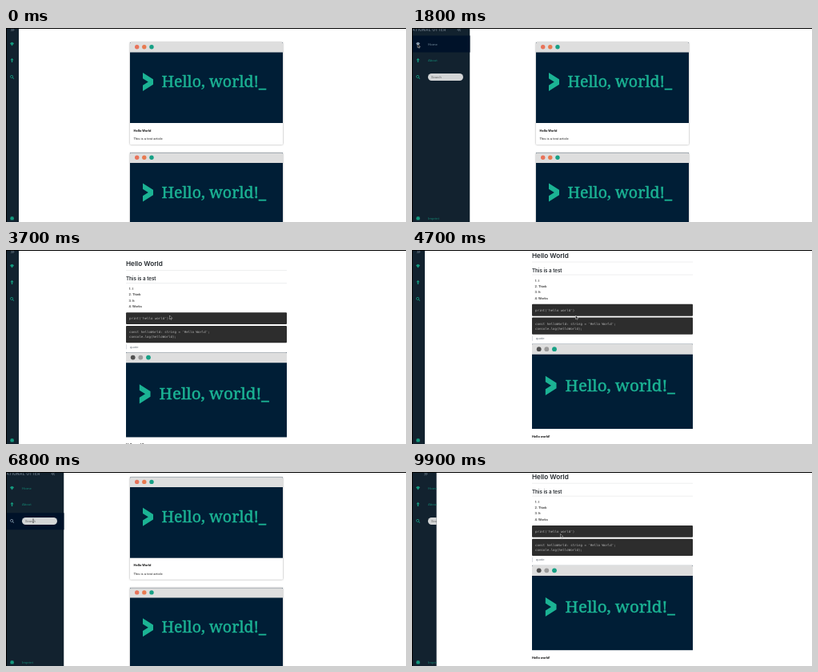
These frames come from a looping animation (500x243 px, 10 s). An HTML page:

```html
<!DOCTYPE html>
<html lang="en">
<head>
<meta charset="utf-8">
<title>Blog walkthrough</title>
<style>
html, body { margin: 0; width: 100%; height: 100%; overflow: hidden; background: #fff; }
svg { display: block; width: 100vw; height: 100vh; font-family: Roboto, sans-serif; font-size: 4.2px; }
.sheet { fill: #fff; filter: drop-shadow(0 .6px 1.2px rgba(0,0,0,.38)); }
.hero { font: 500 19.6px "Noto Serif", serif; fill: #1bb394; stroke: #1bb394; stroke-width: .45; }
.b { font-weight: 700; fill: #111; }
.h { font-family: Inter, sans-serif; font-weight: 600; fill: #24292e; }
.code { font: 4.08px "DejaVu Sans Mono", monospace; fill: #b4b4b4; white-space: pre; }
.list { fill: #333; font-weight: 500; }
.icon { fill: #14997f; stroke: none; }
.label { fill: #14806f; font-size: 4.4px; }
.on .icon { fill: #8296a8; }
.on .label { fill: #6f8798; }
.row { fill: #001229; opacity: 0; }
.on .row { opacity: 1; }
</style>
</head>
<body>
<svg viewBox="0 0 500 243" preserveAspectRatio="none">
  <defs>
    <g id="banner">
      <rect width="191" height="101" fill="#001e36"/>
      <path d="M0 12.4V1.2Q0 0 1.2 0H189.8Q191 0 191 1.2V12.4Z" fill="#dedede"/>
      <path d="M16 38 29 46.3V52.7L16 61V53.8L22.8 49.5 16 45.2Z" fill="#1bb394"/>
      <text class="hero" x="39.5" y="56">Hello, world!_</text>
    </g>
    <g id="card">
      <rect class="sheet" width="191" height="128" rx="1.2"/>
      <use href="#banner"/>
      <circle cx="8.7" cy="5.7" r="2.7" fill="#e8735a"/>
      <circle cx="17.8" cy="5.7" r="2.7" fill="#e87a50"/>
      <circle cx="27" cy="5.7" r="2.7" fill="#16a085"/>
      <text class="b" x="4.5" y="111.5">Hello World</text>
      <text x="4.5" y="122" fill="#222">This is a test article</text>
    </g>
    <clipPath id="clip"><rect id="clipBox" width="16" height="243"/></clipPath>
  </defs>

  <g id="home">
    <use href="#card" x="155" y="18"/>
    <use href="#card" x="155" y="156.5"/>
  </g>

  <g id="article">
    <text class="h" x="150" y="20.3" font-size="8.2">Hello World</text>
    <path d="M150 25.5H351M150 41.5H351" stroke="#e2e4e6" stroke-width=".6"/>
    <text class="h" x="150" y="38" font-size="6.2">This is a test</text>
    <g class="list" id="list"></g>
    <rect x="150" y="78.3" width="201" height="14.8" rx="1" fill="#2d2d2d"/>
    <rect x="150" y="95" width="201" height="21.2" rx="1" fill="#2d2d2d"/>
    <text class="code" x="154" y="87">print('hello world')</text>
    <text class="code" x="154" y="104">const helloWorld: string = 'Hello World';</text>
    <text class="code" x="154" y="110.3">console.log(helloWorld);</text>
    <rect x="150" y="118.3" width=".9" height="6" fill="#d5d9dd"/>
    <text x="154.8" y="122.6" fill="#6a737d">quote</text>
    <use href="#banner" transform="translate(150 128.2) scale(1.0524)"/>
    <circle cx="158.7" cy="134.6" r="2.9" fill="#525252"/>
    <circle cx="168.3" cy="134.6" r="2.9" fill="#9b9b9b"/>
    <circle cx="178" cy="134.6" r="2.9" fill="#16a085"/>
    <text class="b" x="150" y="245">Hello world!</text>
  </g>

  <g clip-path="url(#clip)">
    <rect width="72.5" height="243" fill="#12222f"/>
    <text id="brand" x="-3" y="4" font-size="5" font-weight="500" letter-spacing=".4" fill="#6e7c89">RATIONAL OTTER</text>
    <path id="fold" d="M-.3 -1.6-1.9 0-.3 1.6M1.7 -1.6.1 0 1.7 1.6" fill="none" stroke="#8493a0" stroke-width=".8"/>
    <g class="item">
      <rect class="row" y="9.5" width="73" height="21"/>
      <path class="icon" d="M5 19.3Q7.5 16.3 10 19.3L7.5 22.6Z"/>
      <text class="label" x="20" y="21.5">Home</text>
    </g>
    <g class="item">
      <rect class="row" y="30.5" width="73" height="21"/>
      <path class="icon" d="M7.5 37.8 9.6 40.2H8.2V43H6.8V40.2H5.4Z"/>
      <text class="label" x="20" y="42">About</text>
    </g>
    <g class="item">
      <rect class="row" y="51.3" width="73" height="21"/>
      <path class="icon" fill-rule="evenodd" d="M7.1 59a1.9 1.9 0 1 0 .01 0ZM7.1 59.8a1.1 1.1 0 1 1-.01 0ZM8.1 62.6 8.7 62 10.2 63.4 9.6 64Z"/>
      <rect x="20" y="57" width="44" height="9" rx="4.5" fill="#d3d5d6"/>
      <text id="query" x="24" y="63">Search</text>
    </g>
    <g class="item">
      <path class="icon" d="M5.6 236.6H7L7.6 235.8 8.3 236.6H9.6V238L10.2 238.6 9.6 239.2V240.4H5.6V239.2L5 238.6 5.6 238Z"/>
      <text class="label" x="20" y="239.8">Imprint</text>
    </g>
    <rect width="1" height="243" fill="#000"/>
  </g>
  <rect width="500" height="1" fill="#000"/>

  <g id="cursor">
    <path id="arrow" d="M0 0V4.6L1.1 3.7 1.8 5.3 2.6 4.9 1.9 3.4H3.3Z" fill="#111" stroke="#fff" stroke-width=".4"/>
    <path id="beam" d="M0 -2V2.5M-.8 -2H.8M-.8 2.5H.8" stroke="#222" stroke-width=".5"/>
  </g>
</svg>

<script>
const LOOP = 10000, STEP = 100;
const $ = id => document.getElementById(id);
const items = [...document.querySelectorAll('.item')];

$('list').innerHTML = ['I', 'Think', 'It', 'Works'].map((word, i) =>
  `<text x="153.5" y="${50 + i * 7.4}">${i + 1}.</text><text x="158" y="${50 + i * 7.4}">${word}</text>`).join('');

const smooth = k => k * k * (3 - 2 * k);

// rows: [time, value, value, ...], eased between neighbours
function track(rows, t) {
  const i = rows.findIndex(r => r[0] > t);
  if (i === 0) return rows[0].slice(1);
  if (i < 0) return rows.at(-1).slice(1);
  const a = rows[i - 1], b = rows[i];
  const k = smooth((t - a[0]) / (b[0] - a[0]));
  return a.slice(1).map((v, n) => v + (b[n + 1] - v) * k);
}
const hold = (rows, t) => rows.filter(r => r[0] <= t).at(-1)[1];

const width = [
  [300, 16], [900, 72.5], [2500, 72.5], [3100, 16],
  [5800, 16], [6400, 72.5], [9500, 72.5], [10100, 16]
];
const scroll = [[4200, 0], [4800, 11.3]];
const pointer = [
  [200, -6, 30], [700, 7, 24], [1300, 7, 20], [1900, 7, 20], [2200, 9, 40],
  [2400, 10, 60], [2600, 22, 62], [3200, 204.5, 82], [4800, 204.5, 82],
  [5600, 22, 31], [5700, 22, 31], [5900, 8, 22], [6500, 8, 20], [6800, 34, 61],
  [9400, 34, 61], [9800, 180, 78], [9900, 185.5, 77.5]
];
const hover = [
  [0, -1], [700, 0], [2100, 1], [2300, 2], [2600, -1],
  [5900, 0], [6600, 2], [9500, -1]
];
const page = [[0, 'home'], [3700, 'article'], [6500, 'home'], [8800, 'article']];
const shape = [[0, 'arrow'], [6700, 'beam'], [7200, ''], [9500, 'arrow']];
const keys = [7800, 7900, 8000, 8100, 8300, 8500, 8600];

const show = (id, on) => $(id).setAttribute('visibility', on ? 'visible' : 'hidden');
const move = (id, x, y) => $(id).setAttribute('transform', `translate(${x} ${y})`);

function draw(ms) {
  const t = Math.floor(ms % LOOP / STEP) * STEP;
  const [w] = track(width, t), [top] = track(scroll, t), [x, y] = track(pointer, t);

  for (const id of ['home', 'article']) {
    show(id, hold(page, t) === id);
    move(id, 0, -top);
  }

  $('clipBox').setAttribute('width', w);
  $('brand').setAttribute('opacity', Math.max(0, (w - 50) / 22.5));
  $('fold').setAttribute('transform', `translate(${Math.max(8, w - 13.5)} 2.3) scale(${w > 44 ? 1 : -1} 1)`);
  const active = hold(hover, t);
  items.forEach((el, i) => el.classList.toggle('on', i === active));

  const typed = t < 9200 ? 'hello w'.slice(0, keys.filter(k => k <= t).length) : '';
  const focus = t >= 7200 && t < 9200;
  $('query').textContent = typed || (focus ? '|' : 'Search');
  $('query').setAttribute('fill', focus ? '#222' : '#666');

  move('cursor', x, y);
  for (const id of ['arrow', 'beam']) show(id, hold(shape, t) === id);
}

const start = performance.now();
function tick() {
  draw(performance.now() - start);
  requestAnimationFrame(tick);
}
tick();
</script>
</body>
</html>
```
